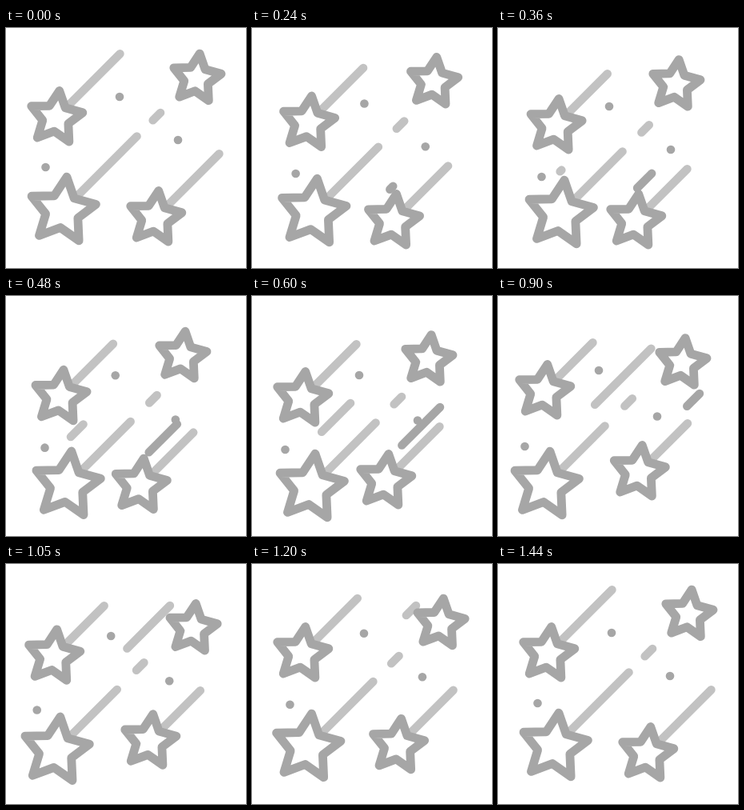
An HTML page with a canvas that plays this animation: 300 px wide and 300 px high, repeating every 1500 ms.

```html
<!DOCTYPE html>
<html lang="en">
<head>
<meta charset="utf-8">
<title>Shooting stars</title>
<style>
  html, body { margin: 0; width: 100%; height: 100%; overflow: hidden; background: #fff; }
  canvas { display: block; width: 100vmin; height: 100vmin; }
</style>
</head>
<body>
<canvas id="stage" width="300" height="300"></canvas>
<script>
const ctx = document.getElementById('stage').getContext('2d');
const LOOP = 1500, STEP = 30, START = 30, END = 1440;
const DARK = '#a6a6a6', LIGHT = '#c2c2c2';

const progress = (t, from, to) => Math.min(1, Math.max(0, (t - from) / (to - from)));
const easeIn = u => u ** 3;
const easeInOut = u => u * u * (3 - 2 * u);

// Smooth curve that leaves zero, passes three values and is back at zero at `back`.
function swing(via, back = END) {
  const times = [START, 360, 600, 900, back];
  const values = [0, ...via, 0];
  const last = times.length - 1;
  const gap = i => times[i + 1] - times[i];
  const rate = i => (values[i + 1] - values[i]) / gap(i);
  const slope = i => {
    if (i === 0) return rate(0);
    if (i === last) return rate(last - 1);
    return (rate(i - 1) * gap(i) + rate(i) * gap(i - 1)) / (gap(i) + gap(i - 1));
  };
  return t => {
    if (t <= START || t >= back) return 0;
    let i = 0;
    while (t >= times[i + 1]) i++;
    const h = gap(i), u = (t - times[i]) / h, v = 1 - u;
    return v * v * ((1 + 2 * u) * values[i] + u * h * slope(i))
         + u * u * ((3 - 2 * u) * values[i + 1] - v * h * slope(i + 1));
  };
}

// Closed path from a home point through three offsets.
function drift(x, y, back, ...via) {
  const dx = swing(via.map(p => p[0]), back);
  const dy = swing(via.map(p => p[1]), back);
  return t => [x + dx(t), y + dy(t)];
}

// `reach` is how far a trail extends sideways from the star's centre.
const stars = [
  { r: 34, reach: 80, at: drift(62.5, 112.2, 1200, [9.3, 10], [0, 16], [-5, 7]) },
  { r: 42.6, reach: 93, dash: 113, at: drift(70.6, 228.4, 1240, [7, 4], [3, 11], [-11, 8]) },
  { r: 34, reach: 80, at: drift(186.5, 237.2, END, [-15, 4], [-20, -6], [-10.5, -17]) },
  { r: 31.4, at: drift(238.2, 63.2, END, [-16, 7.5], [-18, 16.5], [-8, 20.5]) }
];
const shrink = swing([15, 12, 19]);

const dots = [[142, 86], [215, 140], [49.5, 174]].map(([x, y], i) =>
  drift(x, y, 1240, [4 * i - 3, 12], [-8, 13 + 2.5 * i], [-16, 7 + 3.5 * i]));

// Strokes that shoot along the diagonal x + y = sum, from x = a to x = b.
const shots = [
  { sum: 374, a: 172, b: 252, color: DARK, head: [150, 790], tail: [110, 960] },
  { sum: 257, a: 76, b: 205, color: LIGHT, head: [285, 1055], tail: [97, 1237] }
];

function ray(x, y, a, b, color = LIGHT) {
  ctx.beginPath();
  ctx.moveTo(x + a, y - a);
  ctx.lineTo(x + b, y - b);
  ctx.lineWidth = 10.4;
  ctx.strokeStyle = color;
  ctx.stroke();
}

function trail({ r, reach, dash, at }, t) {
  const [x, y] = at(t), cut = shrink(t);
  if (reach) ray(x, y, r * 0.4, reach - cut);
  if (dash) ray(x, y, dash - cut * 0.75, dash + 9.5 - cut * 0.75);
}

function shot({ sum, a, b, color, head, tail }, t) {
  const h = easeInOut(progress(t, ...head)), e = easeIn(progress(t, ...tail));
  if (h > e) ray(0, sum, a + (b - a) * e, a + (b - a) * h, color);
}

function star({ r, at }, t) {
  const [x, y] = at(t);
  ctx.beginPath();
  for (let i = 0; i < 10; i++) {
    const a = (7.2 + 36 * i) * Math.PI / 180;
    const d = i % 2 ? r * 0.5 : r;
    ctx.lineTo(x + d * Math.sin(a), y - d * Math.cos(a));
  }
  ctx.closePath();
  ctx.fillStyle = '#fff';
  ctx.fill();
  ctx.lineWidth = 10.8;
  ctx.strokeStyle = DARK;
  ctx.stroke();
}

function dot(at, t) {
  ctx.beginPath();
  ctx.arc(...at(t), 5.3, 0, Math.PI * 2);
  ctx.fillStyle = DARK;
  ctx.fill();
}

function draw(t) {
  ctx.clearRect(0, 0, 300, 300);
  ctx.lineCap = ctx.lineJoin = 'round';
  stars.forEach(s => trail(s, t));
  shots.forEach(s => shot(s, t));
  stars.forEach(s => star(s, t));
  dots.forEach(d => dot(d, t));
}

const start = performance.now();
function tick() {
  const t = (performance.now() - start) % LOOP;
  draw(Math.floor(t / STEP) * STEP);
  requestAnimationFrame(tick);
}
tick();
</script>
</body>
</html>
```
